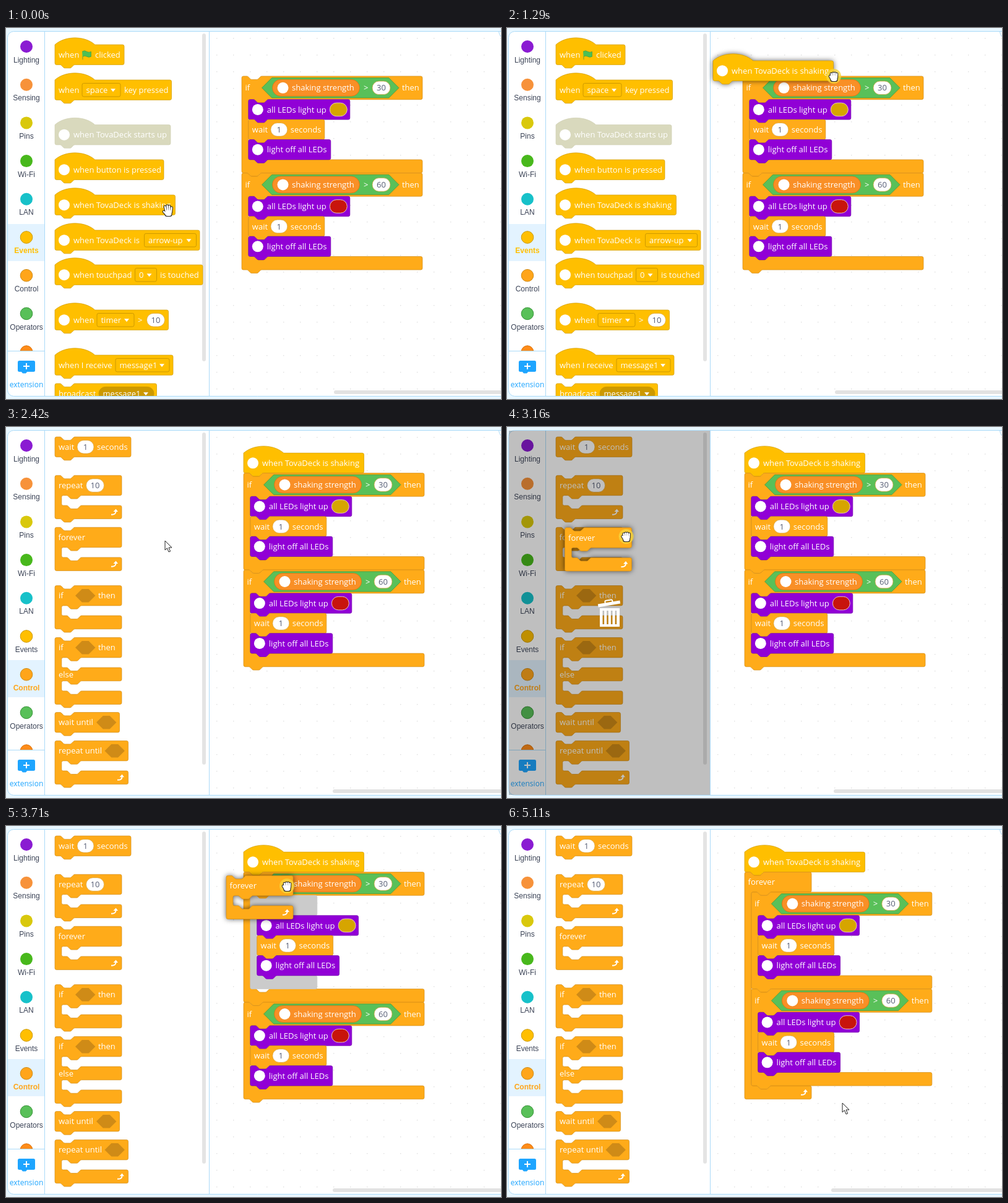
Recreate the animation shown at these times as an HTML page with a canvas. Size 800 by 600 pixels, loop 5.39 s.

```html
<!DOCTYPE html>
<html lang="en">
<head>
<meta charset="utf-8">
<title>Block editor</title>
<style>
html, body { margin: 0; width: 100%; height: 100%; overflow: hidden; background: #e9f7ff; }
canvas { display: block; width: 800px; height: 600px; }
</style>
</head>
<body>
<canvas id="stage" width="800" height="600"></canvas>
<script>
const ctx = document.getElementById('stage').getContext('2d');
const LOOP = 5390, S = 0.675, TAU = Math.PI * 2;
const DEVICE = 'TovaDeck';
const FONT = '13px "Open Sans", "Noto Sans", sans-serif';
const EVENT = ['#ffbf00', '#cc9900'];
const CONTROL = ['#ffab19', '#cf8b17'];
const LIGHT = ['#9100d6', '#7100aa'];
const FADED = ['#d9d9bd', '#d0d0b4'];
const GHOST = ['#cbcbcb', '#cbcbcb'];

// ---- primitives ----
function text(s, x, y, color = '#fff', font = FONT, align = 'left') {
  ctx.font = font;
  ctx.textAlign = align;
  ctx.fillStyle = color;
  ctx.fillText(s, x, y + 4.6);
}
function paint(fill, stroke, width = S) {
  if (fill) { ctx.fillStyle = fill; ctx.fill(); }
  if (stroke) { ctx.strokeStyle = stroke; ctx.lineWidth = width; ctx.stroke(); }
}
function rect(x, y, w, h, r, fill, stroke, width) {
  ctx.beginPath();
  ctx.roundRect(x, y, w, h, r);
  paint(fill, stroke, width);
}
function disc(x, y, r, fill, stroke) {
  ctx.beginPath();
  ctx.arc(x, y, r, 0, TAU);
  paint(fill, stroke, 1);
}
function poly(points, fill, stroke, width) {
  ctx.beginPath();
  points.forEach(p => ctx.lineTo(p[0], p[1]));
  ctx.closePath();
  paint(fill, stroke, width);
}
function hexagon(x, y, w, h, fill, stroke) {
  const r = h / 2;
  poly([[x, y], [x + r, y - r], [x + w - r, y - r], [x + w, y], [x + w - r, y + r], [x + r, y + r]], fill, stroke);
}

// ---- block parts: each draws at the block's left edge and row centre ----
const label = (dx, s) => (x, y) => text(s, x + dx, y);
const badge = dx => (x, y) => disc(x + dx, y, 9, '#fff');
const pill = (dx, w, s) => (x, y) => {
  rect(x + dx, y - 10.8, w, 21.6, 10.8, '#fff', '#d39a2c');
  text(s, x + dx + w / 2, y, '#575e75', FONT, 'center');
};
const slot = dx => (x, y) => hexagon(x + dx, y, 32.4, 21.6, '#cf8b17');
const swatch = (dx, color) => (x, y) => rect(x + dx, y - 10.8, 28, 21.6, 10.8, color, '#e6c6c0', 1);
const menu = (dx, w, s, round) => (x, y) => {
  rect(x + dx, y - 10.8, w, 21.6, round ? 10.8 : 2.7, round ? '#cc9900' : '#ffbf00', '#cc9900', 1);
  text(s, x + dx + 6.5, y);
  const r = x + dx + w - (round ? 13 : 12);
  poly([[r - 4, y - 2], [r + 4, y - 2], [r, y + 3]], '#fff');
};
const flag = dx => (x, y) => {
  ctx.beginPath();
  ctx.moveTo(x + dx, y - 5);
  ctx.quadraticCurveTo(x + dx + 4, y - 8, x + dx + 7.5, y - 5);
  ctx.quadraticCurveTo(x + dx + 11, y - 3, x + dx + 14.5, y - 5);
  ctx.lineTo(x + dx + 14.5, y + 3);
  ctx.quadraticCurveTo(x + dx + 11, y + 5, x + dx + 7.5, y + 3);
  ctx.quadraticCurveTo(x + dx + 4, y + 1, x + dx + 1, y + 3);
  ctx.lineTo(x + dx + 1, y + 8);
  paint('#4cbf56', '#45993d');
};
const loopArrow = (dx, dy) => (x, y) => {
  const cx = x + dx, cy = y + dy;
  ctx.beginPath();
  ctx.moveTo(cx - 5, cy + 3.6);
  ctx.quadraticCurveTo(cx + 2.5, cy + 4, cx + 2.5, cy - 1.5);
  paint(null, '#fff', 2);
  poly([[cx - 1.5, cy - 1], [cx + 2.5, cy - 5.5], [cx + 6, cy - 1]], '#fff');
};
const condition = limit => (x, y) => {
  hexagon(x + 32.5, y, 221.5, 32.4, '#59c059', '#389438');
  rect(x + 49.5, y - 13.5, 141, 27, 13.5, '#f98f26', '#db6e00');
  badge(66.5)(x, y);
  text('shaking strength', x + 81, y);
  text('>', x + 197, y);
  pill(211, 29, limit)(x, y);
  text('then', x + 259, y);
};

// ---- blocks ----
const NOTCH = 'c2 0 3 1 4 2l4 4c1 1 2 2 4 2h12c2 0 3 -1 4 -2l4 -4c1 -1 2 -2 4 -2';
const NOTCH_BACK = 'c-2 0 -3 1 -4 2l-4 4c-1 1 -2 2 -4 2h-12c-2 0 -3 -1 -4 -2l-4 -4c-1 -1 -2 -2 -4 -2';

const make = (color, w, parts, more) => ({ color, w, parts, head: 48, arms: [], ...more });
const gap = kids => kids.length ? kids.reduce((sum, k) => sum + height(k), 0) / S : 24;
const height = b => S * (b.head + b.arms.reduce((sum, kids) => sum + gap(kids) + 32, 0));

function outline(b) {
  const right = b.w / S - 4;
  const edge = `H${right}a4 4 0 0 1 4 4`;
  let d = (b.hat ? 'M0 0c25 -22 71 -22 96 0' : 'M0 4a4 4 0 0 1 4 -4h8' + NOTCH) + edge;
  let y = b.head;
  for (const kids of b.arms) {
    const g = gap(kids);
    d += `V${y - 4}a4 4 0 0 1 -4 4H64${NOTCH_BACK}H20a4 4 0 0 0 -4 4`;
    d += `V${y + g - 4}a4 4 0 0 0 4 4h8${NOTCH}${edge}`;
    y += g + 32;
  }
  return new Path2D(`${d}V${y - 4}a4 4 0 0 1 -4 4${b.cap ? '' : 'H48' + NOTCH_BACK}H4a4 4 0 0 1 -4 -4z`);
}
function draw(b, x, y, lifted) {
  const path = outline(b);
  ctx.save();
  ctx.translate(x, y);
  ctx.scale(S, S);
  ctx.fillStyle = b.color[0];
  if (lifted) { ctx.shadowColor = 'rgba(0,0,0,.65)'; ctx.shadowBlur = 9; }
  ctx.fill(path);
  ctx.shadowColor = 'transparent';
  ctx.strokeStyle = b.color[1];
  ctx.lineWidth = 1;
  ctx.stroke(path);
  ctx.restore();
  b.parts.forEach(part => part(x, y + b.head * S / 2));
  let top = y + b.head * S;
  for (const kids of b.arms) {
    drawStack(kids, x + 16 * S, top);
    top += (gap(kids) + 32) * S;
  }
}
function drawStack(list, x, y) {
  for (const b of list) {
    draw(b, x, y);
    y += height(b);
  }
}

const hat = (w, parts, color = EVENT) => make(color, w, parts, { hat: true });
const deviceHat = (w, s, ...rest) => hat(w, [badge(15), label(30, s), ...rest]);
const wait = make(CONTROL, 123, [label(6, 'wait'), pill(36, 27, '1'), label(68, 'seconds')]);
const lightOff = make(LIGHT, 133, [badge(15), label(30, 'light off all LEDs')]);
const lightUp = color => make(LIGHT, 164, [badge(15), label(30, 'all LEDs light up'), swatch(131.5, color)]);
const body = color => [lightUp(color), wait, lightOff];
const ifThen = (limit, kids) => make(CONTROL, 292, [label(5.5, 'if'), condition(limit)], { head: 56, arms: [kids] });
const forever = make(CONTROL, 108, [label(5.5, 'forever'), loopArrow(96, 43.5)], { arms: [[]], cap: true });
const ghostLoop = kids => make(GHOST, 108, [], { arms: [kids], cap: true });
const onShake = deviceHat(194.5, `when ${DEVICE} is shaking`);

const amber = body('#d6a500'), red = body('#c8140c');
const pair = [ifThen('30', amber), ifThen('60', red)];
const pairOpened = [ifThen('30', [ghostLoop(amber)]), pair[1]];
const wrapPreview = [ghostLoop(pair)];
const finished = [{ ...forever, arms: [pair], parts: [label(5.5, 'forever'), loopArrow(96, 340.5)] }];

const eventBlocks = [
  [27, hat(112, [label(6, 'when'), flag(44), label(65, 'clicked')])],
  [84, hat(188.5, [label(6, 'when'), menu(44, 62, 'space'), label(112, 'key pressed')])],
  [156.5, hat(187, [badge(15), label(30, `when ${DEVICE} starts up`)], FADED)],
  [213, deviceHat(176, 'when button is pressed')],
  [270, onShake],
  [327, deviceHat(234, `when ${DEVICE} is`, menu(144.5, 84, 'arrow-up'))],
  [383, deviceHat(239, 'when touchpad', menu(129.5, 35, '0'), label(170, 'is touched'))],
  [456, deviceHat(183.5, 'when', menu(68, 60, 'timer'), label(134, '>'), pill(148.5, 29, '10'))],
  [529, hat(191, [label(6, 'when I receive'), menu(98, 87, 'message1')])],
  [575, make(EVENT, 164.5, [label(6, 'broadcast'), menu(71, 89, 'message1', true)])]
];
const controlBlocks = [
  [16, wait],
  [78.3, make(CONTROL, 108, [label(6, 'repeat'), pill(50.5, 29, '10'), loopArrow(96, 43.5)], { arms: [[]] })],
  [162.3, forever],
  [256.5, make(CONTROL, 108, [label(6, 'if'), slot(33), label(70, 'then')], { arms: [[]] })],
  [340.5, make(CONTROL, 108, [label(6, 'if'), slot(33), label(70, 'then'),
    (x, y) => text('else', x + 6, y + 43.2)], { arms: [[], []] })],
  [461.5, make(CONTROL, 104.5, [label(6, 'wait until'), slot(67)])],
  [507.5, make(CONTROL, 118.5, [label(6, 'repeat until'), slot(80.5), loopArrow(106, 43.5)], { arms: [[]] })]
];

// ---- timing: [first, last, number of picture changes] ----
const steps = [
  [0, 270, 2], [530, 1000, 6], [1100, 1570, 6], [1670, 1770, 2], [1970, 2420, 6], [2590, 3050, 6],
  [3160, 3330, 3], [3430, 3610, 3], [3710, 3710, 1], [3890, 4170, 4], [4450, 4930, 6], [5020, 5110, 2]
].flatMap(([a, b, n]) => Array.from({ length: n }, (_, i) =>
  Math.round((a + (b - a) * i / Math.max(1, n - 1)) / 10) * 10));

const pointerPath = [
  [0, 262, 296], [270, 263, 298], [500, 263, 298], [720, 346, 194], [1000, 439, 118], [1290, 528, 78],
  [1570, 576, 74], [1970, 576, 74], [2060, 360, 220], [2150, 50, 398], [2240, 42, 400], [2420, 257, 184],
  [2500, 257, 184], [3050, 169, 179], [3120, 169, 179], [3330, 293, 168], [3430, 352, 145], [3610, 449, 101],
  [3710, 454, 97], [3890, 472, 82], [4170, 480, 80], [4450, 480, 82], [4930, 541, 439], [5110, 542, 448]
];
const hatPath = [[500, 79, 270], [720, 148, 172], [1000, 236, 97], [1290, 333, 53], [1570, 384, 42.1]];
const loopPath = [[3120, 79, 162.3], [3330, 155, 165], [3430, 225, 138], [3610, 347, 85],
  [3710, 356, 80.3], [3890, 374, 68], [4170, 383, 65]];

function along(path, t) {
  const i = path.findIndex(p => p[0] > t);
  if (i < 0) return path[path.length - 1].slice(1);
  if (!i) return path[0].slice(1);
  const [t0, x0, y0] = path[i - 1], [t1, x1, y1] = path[i];
  const k = (t - t0) / (t1 - t0);
  return [x0 + (x1 - x0) * k, y0 + (y1 - y0) * k];
}
const within = (t, a, b) => t >= a && t < b;

// ---- interface ----
const categories = [
  ['Lighting', '#8a1bd2'], ['Sensing', '#f7923a'], ['Pins', '#d9c80c'], ['Wi-Fi', '#48b81c'], ['LAN', '#17c1c9'],
  ['Events', '#ffbf00', '#cc9900'], ['Control', '#ffa51a', '#cf8b17'], ['Operators', '#59c059', '#389438'],
  ['', '#ff8c1a', '#db6e00']
];
function frame() {
  ctx.fillStyle = '#e9f7ff';
  ctx.fillRect(0, 0, 800, 600);
  rect(2.5, 5.5, 820, 590, 10, '#fff', '#aadaf8', 1);
  ctx.fillStyle = '#dfdfdf';
  for (let x = 340; x < 800; x += 27)
    for (let y = 16; y < 590; y += 27) ctx.fillRect(x, y, 1.4, 1.4);
  ctx.beginPath();
  ctx.moveTo(796.5, 6);
  ctx.quadraticCurveTo(797, 11, 800, 14);
  paint(null, '#aadaf8', 1);
}
function sidebar(active) {
  const sans = '12px "Liberation Sans", Arial, sans-serif';
  ctx.fillStyle = '#e3f3ff';
  ctx.fillRect(3, active === 5 ? 317 : 377, 59, 60);
  ctx.save();
  ctx.beginPath();
  ctx.rect(3, 6, 59, 516);
  ctx.clip();
  categories.forEach(([name, color, rim], i) => {
    const y = 30 + i * 61.7;
    disc(33, y, rim ? 9.8 : 10, color, rim);
    const on = i === active;
    text(name, 33, y + 21, on ? color : '#3d4558', on ? 'bold ' + sans : sans, 'center');
  });
  ctx.restore();
  ctx.fillStyle = '#aadaf8';
  ctx.fillRect(3, 522, 59, 1);
  ctx.fillRect(62, 6, 1, 589);
  ctx.fillRect(328, 6, 1, 589);
  rect(19, 538, 28, 18, 2.5, '#1ea5ff');
  poly([[24, 555], [35, 555], [32, 558.5], [27, 558.5]], '#1ea5ff');
  ctx.fillStyle = '#fff';
  ctx.fillRect(28, 546, 10, 2);
  ctx.fillRect(32, 542, 2, 10);
  text('extension', 33, 576.5, '#1ea5ff', FONT.replace('13', '12'), 'center');
}
function palette(blocks, barHeight) {
  ctx.save();
  ctx.beginPath();
  ctx.rect(63, 6, 265, 589);
  ctx.clip();
  rect(317, 9, 6, barHeight, 3, '#e4e4e4');
  blocks.forEach(([y, b]) => draw(b, 79, y));
  ctx.restore();
}
function trash() {
  ctx.beginPath();
  ctx.rect(150, 293, 32, 30);
  for (let i = 0; i < 4; i++) ctx.rect(154.5 + i * 6.7, 297, 2.6, 22);
  ctx.fillStyle = '#fff';
  ctx.fill('evenodd');
  ctx.save();
  ctx.translate(165, 286);
  ctx.rotate(-0.17);
  ctx.fillRect(-18, -2.5, 36, 5);
  rect(-6, -6, 12, 5, 2, null, '#fff', 2);
  ctx.restore();
}

// ---- pointer ----
function hand(x, y, closed) {
  const tips = closed ? [[-4, -4], [-1, -5], [2, -5], [5, -4]] : [[-5, -7], [-1.5, -8.5], [2, -8], [5.5, -5.5]];
  ctx.save();
  ctx.translate(x, y);
  ctx.lineCap = ctx.lineJoin = 'round';
  for (const [color, width, grow] of [['#222', 4.6, 1], ['#fff', 2.6, 0]]) {
    ctx.beginPath();
    tips.forEach(([tx, ty], i) => {
      ctx.moveTo(tx, ty);
      ctx.lineTo(-3 + i * 2.6, 2);
    });
    ctx.moveTo(closed ? -6 : -7, closed ? 0 : 1);
    ctx.lineTo(-3, 5);
    paint(null, color, width);
    rect(-4.5 - grow, -1 - grow, 10 + 2 * grow, 9 + 2 * grow, 3.5, color);
  }
  ctx.restore();
}
function arrow(x, y) {
  const shape = [[0, 0], [0, 15], [3.4, 11.8], [6, 18], [8.6, 17], [6, 11], [11, 11]];
  ctx.lineJoin = 'miter';
  poly(shape.map(([dx, dy]) => [x + dx, y + dy]), '#fff', '#222', 1);
}
function pointer(t) {
  const [x, y] = along(pointerPath, t);
  const pressed = within(t, 270, 1670) || within(t, 3050, 4450);
  if (pressed) disc(x, y, 12, 'rgba(248,214,60,.8)');
  if (within(t, 2060, 2770) || t >= 4500) arrow(x, y);
  else hand(x, y, pressed);
}

function workspace(t) {
  const joined = t >= 1970;
  const barX = t >= 4450 ? 524 : joined ? 528 : 530;
  rect(barX, 586, 290, 6, 3, '#e2e2e2');
  if (joined) draw(onShake, 384, 42.1);
  const stack = t >= 4450 ? finished : t >= 3890 ? wrapPreview : t >= 3710 ? pairOpened : pair;
  drawStack(stack, joined ? 384 : 381, joined ? 74.5 : 77.9);
}
function render(time) {
  const t = steps.findLast(s => s <= time);
  const control = t >= 2150;
  frame();
  workspace(t);
  sidebar(control ? 6 : 5);
  palette(control ? controlBlocks : eventBlocks, control ? 537 : 530);
  if (within(t, 530, 720) || within(t, 3160, 3430)) {
    ctx.fillStyle = 'rgba(0,0,0,.25)';
    ctx.fillRect(3, 6, 325, 589);
  }
  if (within(t, 530, 1000) || within(t, 3160, 3710)) trash();
  if (within(t, 530, 1970)) draw(onShake, ...along(hatPath, t), t < 1770);
  if (within(t, 3160, 4450)) draw(forever, ...along(loopPath, t), true);
  pointer(t);
}
function tick() {
  render(performance.now() % LOOP);
  requestAnimationFrame(tick);
}
tick();
</script>
</body>
</html>
```
